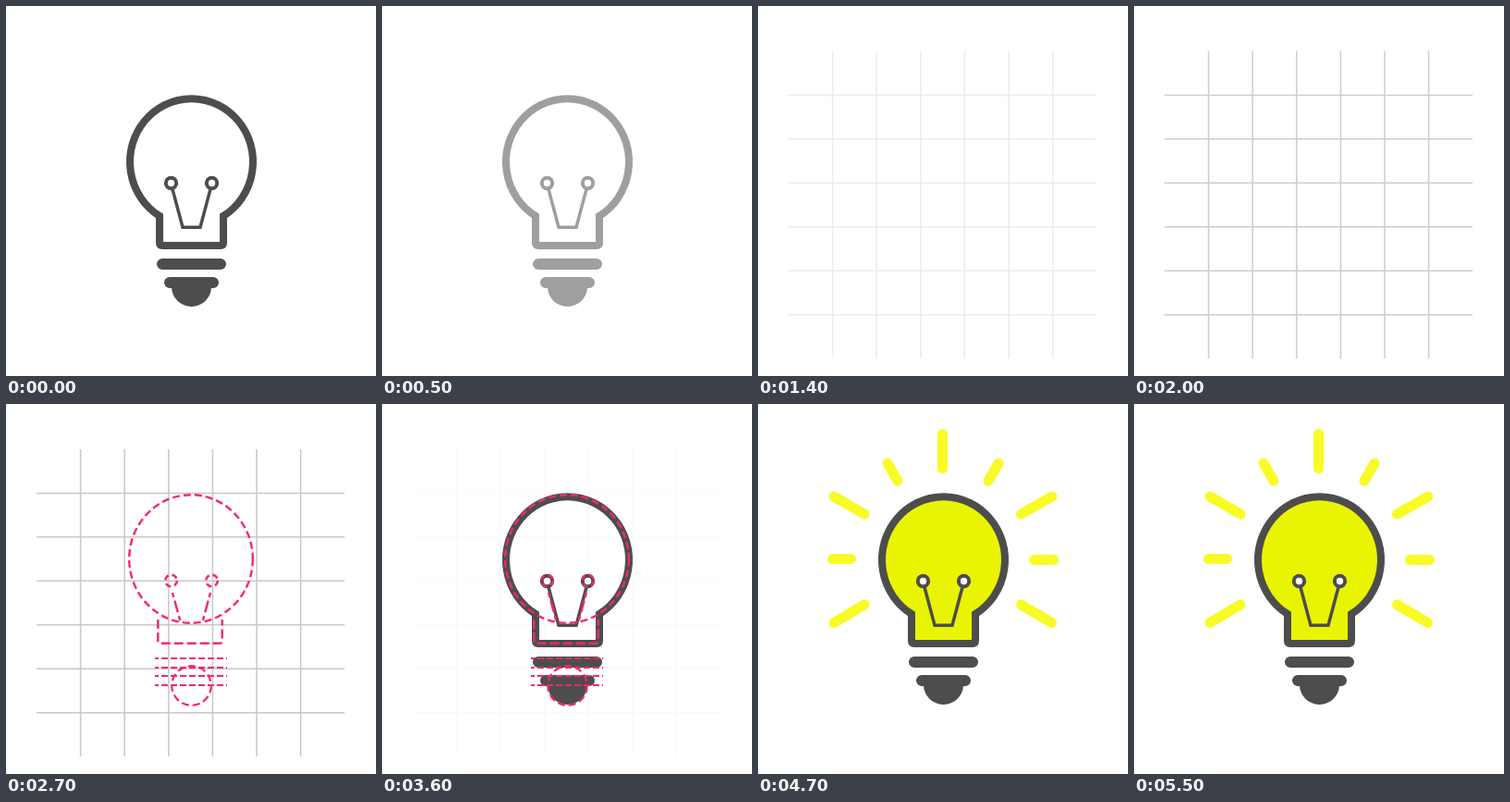
Animation of 400 by 400 pixels, one loop 5.7 s. Source, as an HTML page:

```html
<!DOCTYPE html>
<html lang="en">
<head>
<meta charset="utf-8">
<title>Light bulb</title>
<style>
  html, body { margin: 0; width: 100%; height: 100%; overflow: hidden; background: #fff; }
  svg { display: block; width: 100%; height: 100%; }
</style>
</head>
<body>
<svg viewBox="0 0 400 400">
  <path id="grid" fill="none" stroke="#c8c8c8" stroke-width="1.5"/>

  <g id="rays" stroke="#f8fb25" stroke-width="11" stroke-linecap="round">
    <path d="M199.5 32.5V69.5M140 64L151 83M260 64L249 83M82 100L115 119M318 100L284.5 119
             M80.5 167.5H100.5M298.5 168.5H319.5M82 236.5L115 217M317.5 236.5L284.5 217"/>
  </g>

  <g id="bulb" fill="none" stroke="#4d4d4d">
    <path id="glass" stroke-width="8"
          d="M166 227V256q0 3 3 3H232q3 0 3-3V227A66.5 68.4 0 1 0 166 227Z"/>
    <path stroke-width="3.5" d="M180 198L191 239.3H210L221 198"/>
    <g fill="#fff" stroke-width="4">
      <circle cx="178.5" cy="191.5" r="5.7"/>
      <circle cx="222.5" cy="191.5" r="5.7"/>
    </g>
    <path stroke-width="12" stroke-linecap="round" d="M169 279H232M177 299H224"/>
    <path fill="#4d4d4d" stroke="none" d="M179 303.5A21.5 21.5 0 0 0 222 303.5Z"/>
  </g>

  <!-- construction lines, in order of appearance -->
  <g id="dashes" fill="none" stroke="#f5286a" stroke-width="2.4">
    <ellipse cx="200" cy="167.5" rx="66.8" ry="69.3" stroke-dasharray="8 4"/>
    <path d="M164.3 233V256q0 2.7 2.7 2.7H231q2.7 0 2.7-2.7V233" stroke-dasharray="10 4"/>
    <path d="M180 204L189 237M221 204L212 237" stroke-dasharray="5 4 13 4"/>
    <g stroke-dasharray="6 4">
      <circle cx="178.5" cy="191" r="6.3"/>
      <circle cx="222.5" cy="191" r="6.3"/>
    </g>
    <path d="M161 275H239M161 285H239" stroke-width="2" stroke-dasharray="7 3" stroke-dashoffset="3"/>
    <path d="M161 294H239M161 304H239" stroke-width="2" stroke-dasharray="7 3" stroke-dashoffset="3"/>
    <circle cx="200.5" cy="304.5" r="21.3" stroke-width="2.2" stroke-dasharray="8 4"/>
  </g>
</svg>
<script>
const LOOP = 5700, STEP = 100;
const [grid, rays, bulb, glass, dashes] =
  ['grid', 'rays', 'bulb', 'glass', 'dashes'].map(id => document.getElementById(id));

grid.setAttribute('d', Array.from({ length: 6 }, (_, i) => {
  const x = 80.6 + i * 47.6, y = 96.4 + i * 47.45;
  return `M${x} 49V381M33 ${y}H366`;
}).join(''));

const ramp = (t, from, to) => Math.min(1, Math.max(0, (t - from) / (to - from)));
const setOpacity = (el, value) => el.setAttribute('opacity', value);

function render(time) {
  const t = Math.floor((time % LOOP) / STEP) * STEP;

  setOpacity(bulb, t < 2800 ? 1 - ramp(t, 0, 1070) : 1);
  setOpacity(grid, t < 2700 ? ramp(t, 1000, 2100) : 1 - ramp(t, 2700, 3700));

  // Construction lines pop in one by one, then fade together.
  [...dashes.children].forEach((el, i) => setOpacity(el, t >= 2100 + i * STEP ? 1 : 0));
  setOpacity(dashes, t < 4700 ? 1 - ramp(t, 3700, 4650) : 0);

  const lit = t >= 4700;
  glass.setAttribute('fill', lit ? '#e9f500' : 'none');
  setOpacity(rays, lit && Math.floor((t - 4700) / 200) % 2 === 0 ? 1 : 0);
}

const start = performance.now();
function tick() {
  render(performance.now() - start);
  requestAnimationFrame(tick);
}
tick();
</script>
</body>
</html>
```
